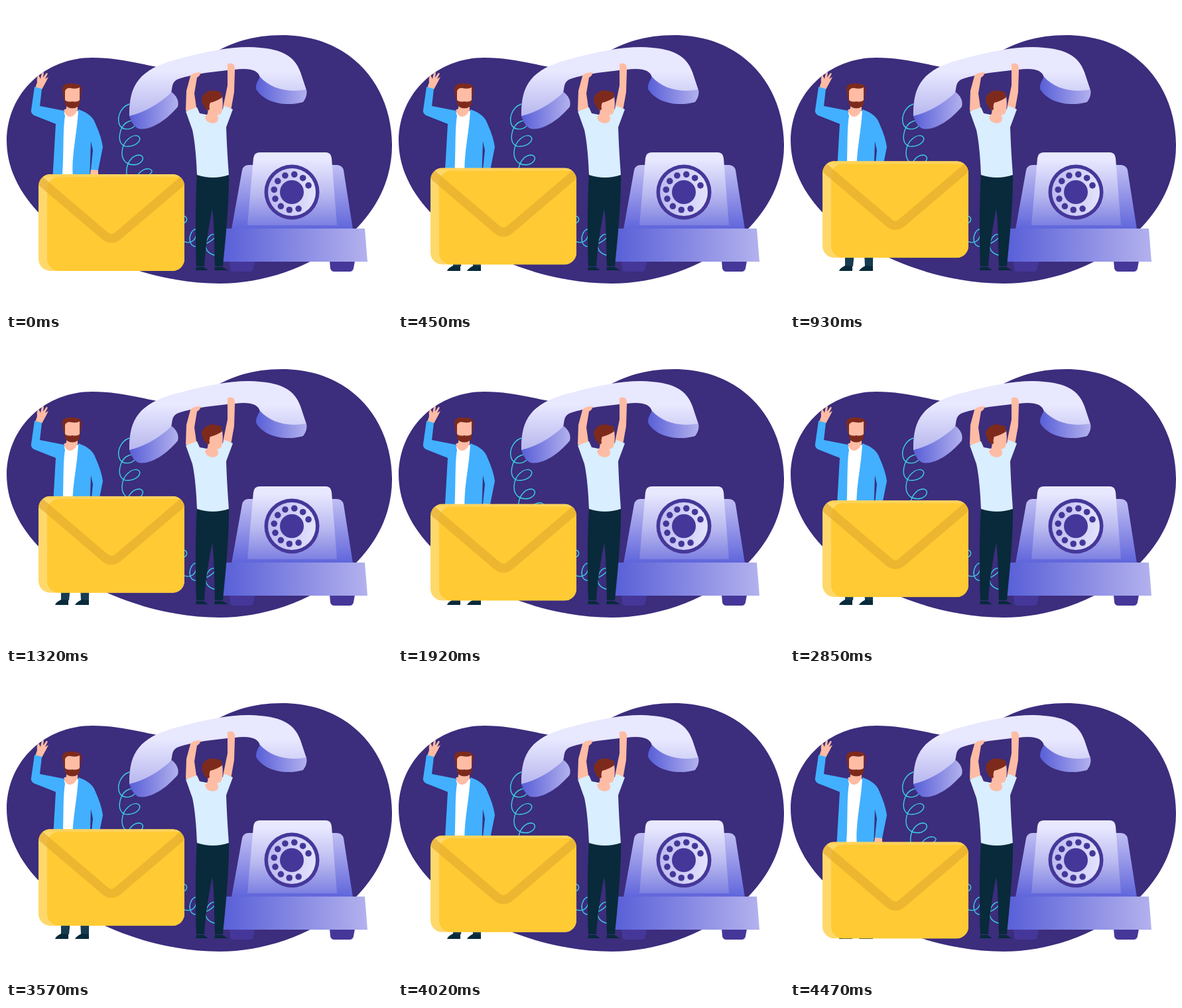
An HTML page for the animation above (4500 ms loop, 582 by 462 pixels).

```html
<!DOCTYPE html>
<html lang="en">
<head>
<meta charset="utf-8">
<title>Mail and phone</title>
<style>
html, body { margin: 0; width: 100%; height: 100%; overflow: hidden; background: #fff; }
svg { display: block; width: 582px; height: 462px; }
.skin { fill: #ffbca4; }
.hair { fill: #7d2a1d; }
.dark { fill: #453799; }
.shoe { fill: #082a3a; }
.cord { fill: none; stroke: #3bd0df; stroke-width: 1.4; }
</style>
</head>
<body>
<svg viewBox="0 0 582 462">
  <defs>
    <linearGradient id="handle" x1="0" y1="0" x2="0" y2="1">
      <stop offset=".35" stop-color="#e8e8ff"/><stop offset="1" stop-color="#b7b6ee"/>
    </linearGradient>
    <linearGradient id="cap">
      <stop offset="0" stop-color="#585fd7"/><stop offset="1" stop-color="#b3b1ee"/>
    </linearGradient>
    <linearGradient id="back" x1="0" y1="0" x2="0" y2="1">
      <stop offset="0" stop-color="#c0bef3"/><stop offset="1" stop-color="#5f65db"/>
    </linearGradient>
    <linearGradient id="front" x1="0" y1="0" x2="0" y2="1">
      <stop offset=".1" stop-color="#e8e8ff"/><stop offset=".55" stop-color="#bdbcf1"/>
      <stop offset="1" stop-color="#7d80e1"/>
    </linearGradient>
    <linearGradient id="dial">
      <stop offset="0" stop-color="#bcbaf0"/><stop offset="1" stop-color="#e4e3fd"/>
    </linearGradient>
    <clipPath id="mailShape"><rect x="49" y="254" width="220" height="146" rx="18"/></clipPath>
  </defs>

  <path fill="#3c2d7d" d="M1 203C2 130 60 78 130 78C185 78 225 96 258 95C298 92 325 44 416 44C520 44 582 120 582 210C582 340 440 419 322 419C180 419 1 330 1 203Z"/>

  <!-- cord -->
  <path class="cord" d="M186 148C172 153 166 170 172 181C179 190 196 185 195 177C193 170 178 173 173 188C168 203 174 213 184 212C198 211 205 202 200 197C192 192 176 203 175 220C174 236 186 242 198 239C208 235 209 226 201 225C190 225 180 238 182 254C186 266 220 258 220 249C217 242 200 246 196 262"/>
  <path class="cord" d="M260 328C276 330 275 317 267 317M262 352C276 362 286 355 287 344Q288 335 283 338C274 345 275 365 288 363C300 361 318 352 315 345C307 342 297 358 303 369Q310 378 322 376"/>

  <!-- telephone -->
  <path class="dark" d="M337 385H375L373 396Q372 401 367 401H343Q338 401 338 396ZM488 385H526L524 396Q523 401 518 401H495Q490 401 489 396Z"/>
  <path fill="url(#back)" d="M340 337L356 248Q358 240 366 240H498Q507 240 509 248L523 337Z"/>
  <path fill="url(#front)" d="M364 331L373 230Q374 221 383 221H482Q490 221 491 230L499 331Z"/>
  <path fill="url(#cap)" d="M331 336H541L545 386H325Z"/>
  <circle cx="431" cy="281" r="41.5" class="dark"/>
  <circle cx="431" cy="281" r="36" fill="url(#dial)"/>
  <circle cx="431" cy="281" r="18" class="dark"/>
  <g id="holes"></g>

  <!-- handset -->
  <path fill="url(#handle)" d="M186 167C185 120 200 95 260 80C300 69 335 62 366 62C415 63 435 75 444 100L453 127C430 132 400 128 383 108C381 96 365 93 345 96C310 99 275 104 258 111C249 116 251 125 249 131Q225 158 186 167Z"/>
  <path fill="url(#cap)" d="M383 107C398 124 425 132 453 126Q455 136 448 145C425 152 390 148 377 125Q376 118 383 107Z"/>
  <path fill="url(#cap)" d="M186 166Q220 158 250 130Q262 140 259 152C240 175 215 189 199 185Q190 180 186 166Z"/>

  <!-- man holding the handset -->
  <path class="skin" d="M271 158L272 128L278 106Q279 101 294 100Q293 105 288 108L284 132L288 160ZM327 154L334 120L334 88Q337 85 343 88Q346 92 345 98L344 130L339 158Z"/>
  <path fill="#082a3a" d="M288 250H336C337 285 332 345 327 393H315C314 360 314 325 311 306C306 330 301 362 299 393H287C285 345 286 290 288 250Z"/>
  <path class="shoe" d="M287 394H298L305 399H286ZM315 394H326L335 399H314Z"/>
  <path fill="#d9eeff" d="M271 159L288 153L292 162L302 164H320L330 151L342 156L332 183Q333 215 336 255Q312 263 288 255C287 225 284 200 281 187Z"/>
  <path class="skin" d="M304 154L316 158Q318 166 320 168Q321 177 311 177Q301 176 300 167Q306 164 304 154Z"/>
  <path class="skin" d="M303 145L326 136Q328 152 325 161Q320 168 311 162L303 157Z"/>
  <path class="hair" d="M304 158Q296 151 295 141Q296 132 306 128Q316 126 325 131L326 138Q317 144 308 146Q306 150 307 156Z"/>

  <!-- waving man -->
  <path fill="#173b50" d="M82 240H127L125 393H113L107 270L95 393H83Z"/>
  <path class="shoe" d="M83 392L94 393V400H74Q75 396 83 392ZM114 392L125 393V400H104Q106 396 114 392Z"/>
  <path class="skin" d="M128 247L139 246V260H126ZM44 124L47 115Q46 107 49 104L52 110L54 101L57 100L56 108L61 101L63 102L59 110L64 107L60 115L54 126Z"/>
  <path fill="#fff" d="M87 160L111 158L108 265H82Z"/>
  <path fill="#42b0ff" d="M43 122L54 125L51 151L87 158L89 166C85 190 88 230 84 265H70L75 178L42 165Q37 162 38 157ZM109 156Q130 163 135 178Q144 198 146 213L139 248L128 247L131 218L128 204L126 265H102C96 235 108 190 109 156Z"/>
  <path class="skin" d="M91 145H108L108 157Q103 168 95 167Q89 165 87 157L91 155Z"/>
  <path class="hair" d="M85 124Q86 116 99 117Q114 117 114 126L112 141H87Z"/>
  <path class="skin" d="M89 128Q92 123 97 124Q106 126 111 123V146Q100 150 89 146Z"/>
  <path class="hair" d="M88 141Q92 146 100 144Q108 146 112 141L110 151Q100 158 90 151Z"/>

  <!-- envelope -->
  <g id="mail" clip-path="url(#mailShape)">
    <rect x="49" y="254" width="220" height="146" fill="#ffd86b"/>
    <rect x="62" y="258" width="225" height="142" rx="18" fill="#ffca33"/>
    <path fill="none" stroke="#e3ad2f" stroke-opacity=".65" stroke-width="13.5" d="M46 259L148 346Q159 356 170 346L272 259"/>
    <rect x="49" y="254" width="220" height="4" fill="#ffd35a"/>
  </g>
</svg>
<script>
const LOOP = 4500, HALF = LOOP / 2, TOP_AT = 1080, RISE = 23;
const mail = document.getElementById('mail');

let dots = '';
for (let i = 0; i < 10; i++) {
  const a = (-22 - 30 * i) * Math.PI / 180;
  dots += `<circle class="dark" r="4.8" cx="${431 + 27 * Math.cos(a)}" cy="${281 + 27 * Math.sin(a)}"/>`;
}
document.getElementById('holes').innerHTML = dots;

// Linear rise and fall, mirrored in the second half of the loop
function lift(t) {
  const m = t < HALF ? t : LOOP - t;
  return RISE * (m < TOP_AT ? m / TOP_AT : (HALF - m) / (HALF - TOP_AT));
}

function draw() {
  mail.setAttribute('transform', `translate(0 ${-lift(performance.now() % LOOP)})`);
  requestAnimationFrame(draw);
}
draw();
</script>
</body>
</html>
```
